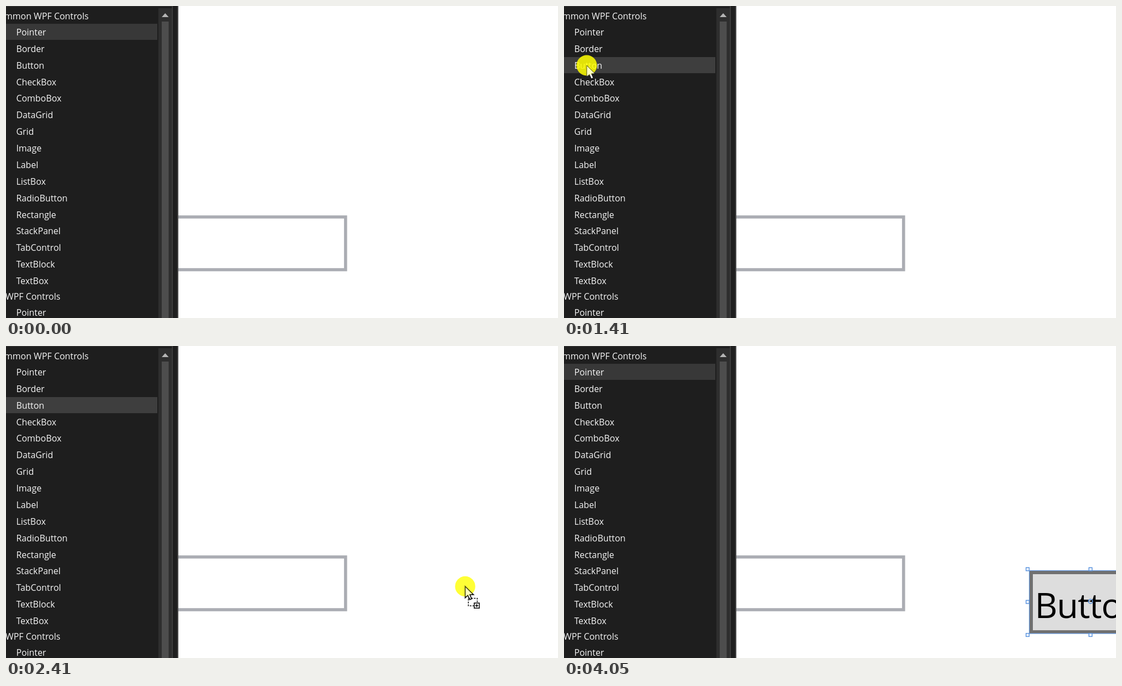
Animation, 996 px wide and 562 px high, one loop 5200 ms. Source, as an HTML page:

```html
<!DOCTYPE html>
<html lang="en">
<head>
<meta charset="utf-8">
<title>Toolbox drag and drop</title>
<style>
  html, body { margin: 0; width: 100%; height: 100%; overflow: hidden; background: #fff; }
  svg { display: block; width: 996px; height: 562px; }
  text { font-family: "Open Sans", "Noto Sans", sans-serif; }
  #labels text { font-size: 15.9px; fill: #f6f6f6; }
  .mark { fill: #fff; stroke: #5f97e0; stroke-width: 1.5; }
</style>
</head>
<body>
<svg viewBox="0 0 996 562">
  <rect width="996" height="562" fill="#fff"/>
  <rect x="280" y="380" width="332.7" height="95" fill="#fff" stroke="#abadb3" stroke-width="5.6"/>

  <g id="panel">
    <rect width="311" height="562" fill="#1e1e1e"/>
    <rect width="300" height="1" fill="#3a3a3a"/>
    <g id="rows"></g>
    <rect x="275" y="4" width="25" height="558" fill="#2e2e2e"/>
    <path d="M281 20h12.5l-6.25-7z" fill="#b4b4b4"/>
    <rect x="281" y="28" width="12.5" height="534" fill="#4d4d4d"/>
    <rect x="299.5" width="1.5" height="562" fill="#424242"/>
    <rect x="309" width="2" height="562" fill="#4a4a4a"/>
    <g id="labels">
      <text x="149" y="24" text-anchor="end">Common WPF Controls</text>
      <text x="98" y="529" text-anchor="end">All WPF Controls</text>
    </g>
  </g>

  <g id="button">
    <rect x="843" y="408" width="216" height="107" fill="#dddddd" stroke="#707070" stroke-width="6"/>
    <rect x="839.5" y="404.5" width="223" height="113.5" fill="none" stroke="#6a9ee6" stroke-width="1.2"/>
    <text x="849.5" y="490" font-size="63" letter-spacing="-1">Button</text>
    <circle cx="950" cy="460" r="3.8" class="mark" style="fill:none"/>
    <g id="handles"></g>
  </g>

  <circle id="trail" r="18.5" fill="#ff0" opacity=".7"/>
  <circle id="under"/>
  <g id="cursor">
    <path id="arrow" d="M0 0V20.5L4.8 16.2L8.2 24L11.8 22.4L8.4 14.9H15Z" fill="#fff" stroke="#111"/>
    <g id="drag" fill="none" stroke="#111" stroke-width="1.6">
      <rect x="5.8" y="21.5" width="16" height="13.5" stroke-dasharray="3 2"/>
      <rect x="16.3" y="30" width="9.2" height="9.2" fill="#fff"/>
      <path d="M18.2 34.6h5.4M20.9 31.9v5.4"/>
    </g>
    <path id="resize" transform="translate(2 1)" d="M-9.5 -3V-9.5H-3M-9.5 -9.5L9.5 9.5M9.5 3V9.5H3"
      fill="none" stroke="#000" stroke-width="1.8"/>
  </g>
  <circle id="over"/>
</svg>

<script>
const LOOP = 5200;
const STEP = 72;
const PITCH = 29.87;
const PRESS = 1320, GRAB = 1490, DROP = 3110, LEAVE = 3670, END = 4050;

const $ = id => document.getElementById(id);
const set = (el, attrs) => { for (const k in attrs) el.setAttribute(k, attrs[k]); return el; };
const add = (parent, tag, attrs) =>
  parent.appendChild(set(document.createElementNS("http://www.w3.org/2000/svg", tag), attrs));
const show = (id, on) => $(id).setAttribute("visibility", on ? "visible" : "hidden");
const clamp = v => Math.min(1, Math.max(0, v));
const easeOut = p => 1 - (1 - p) ** 1.5;

// Toolbox rows
const names = ("Pointer Border Button CheckBox ComboBox DataGrid Grid Image Label ListBox " +
  "RadioButton Rectangle StackPanel TabControl TextBlock TextBox Pointer").split(" ");
const rows = names.map((name, i) => {
  const top = i < 16 ? 32 + PITCH * i : 537;
  add($("labels"), "text", { x: 18.4, y: top + 21 }).textContent = name;
  return { top, bar: add($("rows"), "rect", { y: Math.round(top), width: 273, height: 29 }) };
});

// Selection handles around the button's centre
for (const x of [836.5, 950])
  for (const y of [402, 461, 520.5])
    if (x < 900 || y !== 461)
      add($("handles"), "rect", { x: x - 2.8, y: y - 2.8, width: 5.6, height: 5.6, class: "mark" });

// Pointer key points: time, x, y
const keys = [
  [340, 190, 552], [760, 57, 87],
  [890, 57, 87], [1180, 41, 107],
  [GRAB, 41, 107], [1745, 417, 135], [1830, 469, 161], [2260, 847, 438], [2410, 828.5, 433],
  [2960, 837, 405],
  [LEAVE, 837, 405], [END, 720, 580]
];

// Eased position, held for about one step at a time
function pointerAt(t) {
  const next = keys.findIndex(k => k[0] > t);
  if (next < 1) {
    const [time, x, y] = keys[next < 0 ? keys.length - 1 : 0];
    return { t: time, x, y };
  }
  const [t0, x0, y0] = keys[next - 1], [t1, x1, y1] = keys[next];
  const n = Math.ceil((t1 - t0) / STEP);
  const p = Math.floor((t - t0) / (t1 - t0) * n) / n;
  const e = easeOut(p);
  return { t: t0 + (t1 - t0) * p, x: x0 + (x1 - x0) * e, y: y0 + (y1 - y0) * e };
}

function draw(t) {
  const pos = pointerAt(t);
  const prev = pointerAt(pos.t - STEP);
  const speed = Math.hypot(pos.x - prev.x, pos.y - prev.y);
  const dropped = t >= DROP;
  const dragging = t >= GRAB && !dropped;
  const resizing = dropped && t < LEAVE;
  const visible = t >= 340 && t < END;

  // Row states
  const selected = t >= PRESS + STEP && !dropped ? 2 : 0;
  const hovering = t >= 340 && t < GRAB;
  rows.forEach(({ top, bar }, k) => {
    const hover = hovering && pos.y >= top && pos.y < top + PITCH;
    const lit = hover || k === selected;
    bar.setAttribute("fill", lit ? (hover || k === 2 ? "#3e3e3e" : "#383838") : "none");
  });
  show("button", dropped);

  // Pointer
  set($("cursor"), { transform: `translate(${pos.x} ${pos.y})` });
  show("arrow", visible && !resizing);
  show("drag", dragging);
  show("resize", resizing);
  set($("arrow"), { "stroke-width": dragging ? 1.7 : 1 });

  // Click highlight: paler at speed, partly above the pointer, fading after the drop
  const alpha = dropped
    ? clamp((3470 - t) / 130)
    : clamp((t - PRESS) / STEP) * Math.max(.5, .85 - .006 * speed);
  const top = dropped ? 0 : .3 * alpha;
  const spot = {
    cx: pos.x, cy: pos.y,
    r: 18.5 - Math.min(1.5, speed * .03),
    fill: dropped ? "#ffff5a" : "#ff0"
  };
  set($("under"), { ...spot, opacity: (alpha - top) / (1 - top) });
  set($("over"), { ...spot, opacity: top });
  set($("trail"), { cx: prev.x, cy: prev.y });
  show("trail", t >= 1830 && t < 2190);
}

const start = performance.now();
function tick() {
  draw((performance.now() - start) % LOOP);
  requestAnimationFrame(tick);
}
tick();
</script>
</body>
</html>
```
